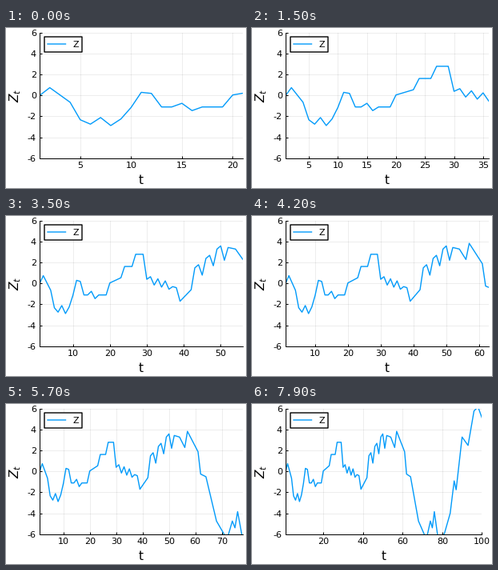
These frames come from a looping animation (300 by 200 pixels, 8 s). A matplotlib script:

```python
import matplotlib.pyplot as plt
import numpy as np
from matplotlib.animation import FuncAnimation
from matplotlib.patches import Rectangle

plt.rcParams.update({
    "font.family": "DejaVu Sans",
    "font.size": 8,
    "mathtext.fontset": "dejavusans",
    "axes.unicode_minus": False,
    "axes.linewidth": 0.72,
    "toolbar": "None",
})

W, H, DPI = 300, 200, 100
LEFT, RIGHT, TOP, BOTTOM = 42.0, 296.1, 6.1, 162.6
START, STEPS = 21, 80
BLUE = "#009AFA"
DIGIT = 7.06  # advance of one tick label digit in pixels

# Main turning points (t, Z) of the walk
TURNS = [
    (1, 0), (2, .75), (4, -.65), (5, -2.33), (9, -2.6), (11, .3), (12, .2),
    (13, -1.1), (19, -1.1), (20, .05), (23, .55), (24, 1.63), (26, 1.63),
    (27, 2.8), (29, 2.8), (30, .4), (38, -.4), (39, -1.7), (42, -.6),
    (43, 1.5), (50, 3.6), (54, 3.3), (56, 2.3), (57, 3.85), (61, 1.9),
    (62, -.25), (64, -.5), (68, -4.75), (72, -6.5), (74, -4.75), (75, -5.4),
    (76, -3.85), (78, -6.6), (81, -6), (84, -4), (86, -.9), (87, -1.75),
    (90, 3.3), (93, 2.5), (96, 5.8), (98, 6.2), (100, 5.15),
]


def between(t, low, high):
    return (t >= low) & (t <= high)


def make_walk(t):
    """Straight runs between turns, a zigzag on plateaus, dips on the climb."""
    z = np.interp(t, *zip(*TURNS))
    plateau = between(t, 6, 9) | between(t, 15, 16) | between(t, 31, 36)
    z += np.where(plateau, np.where(t % 2, 0.35, -0.35), 0)
    z -= np.where(between(t, 43, 51) & (t % 3 == 0), 1.3, 0)
    return z


T = np.arange(1, START + STEPS)
Z = make_walk(T)

fig = plt.figure(figsize=(W / DPI, H / DPI), dpi=DPI, facecolor="white")
ax = fig.add_axes([0, 0, 1, 1])
ax.spines[["top", "right"]].set_visible(False)
ax.set_ylim(-6, 6)
ax.set_yticks(range(-6, 7, 2))
ax.tick_params(direction="in", length=2.2, width=0.72, pad=3)
ax.grid(color="black", alpha=0.07, linewidth=0.72)
ax.set_axisbelow(True)
curve, = ax.plot([], [], color=BLUE, linewidth=1, solid_joinstyle="round")

# Overlay in pixel coordinates for the legend and axis titles
over = fig.add_axes([0, 0, 1, 1], facecolor="none")
over.set(xlim=(0, W), ylim=(H, 0))
over.axis("off")
over.add_patch(Rectangle((48, 11), 47, 19, facecolor="white", snap=False,
                         edgecolor="black", linewidth=1, joinstyle="round"))
over.plot([52, 74.5], [20, 20], color=BLUE, linewidth=1, snap=False)
over.text(87.5, 20.5, "Z", ha="center", va="center_baseline")
over.text(11.5, 84.5, "$Z_t$", fontsize=11, rotation=90,
          ha="center", va="center")
x_title = over.text(0, 195, "t", fontsize=11, ha="center", va="baseline")


def tick_step(last):
    return 5 if last < 40 else 10 if last < 80 else 20


def right_edge(last, tick):
    """Pull the axis in when the last tick label would leave the stage."""
    half = DIGIT * len(str(tick)) / 2
    x = LEFT + (RIGHT - LEFT) * (tick - 1) / (last - 1)
    return 298 - half if x + half > 299.6 else RIGHT


def update(i):
    last = START + i
    step = tick_step(last)
    ticks = list(range(step, last + 1, step))
    right = right_edge(last, ticks[-1])
    ax.set_position([LEFT / W, 1 - BOTTOM / H,
                     (right - LEFT) / W, (BOTTOM - TOP) / H])
    ax.set_xlim(1, last)
    ax.set_xticks(ticks)
    curve.set_data(T[:last], Z[:last])
    x_title.set_x((LEFT + right) / 2)
    return curve, x_title


anim = FuncAnimation(fig, update, frames=STEPS, interval=100,
                     repeat=True, repeat_delay=0, blit=False)
plt.show()
```
